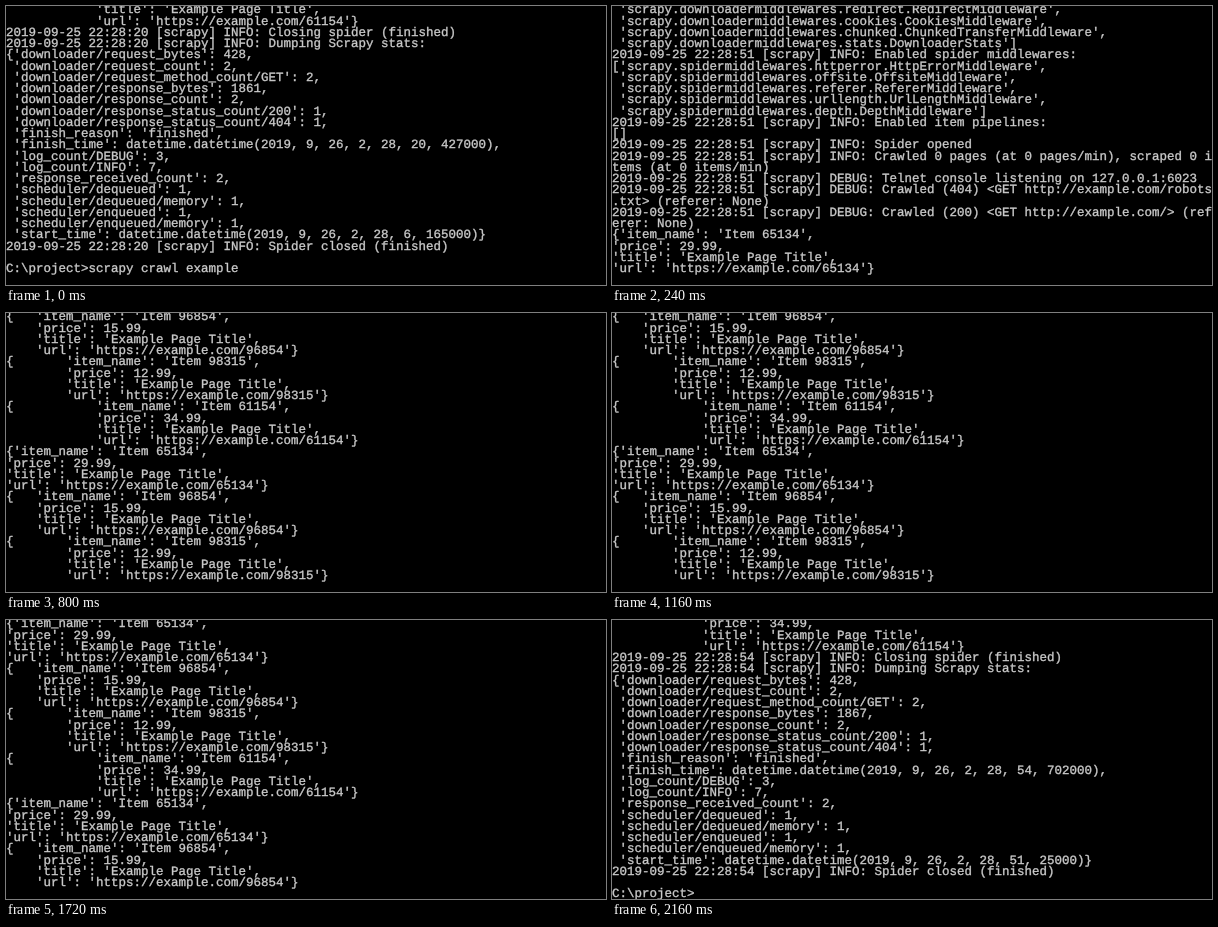
An HTML page that plays this animation: 600 px wide and 279 px high, repeating every 2.2 s.

```html
<!DOCTYPE html>
<html lang="en">
<head>
<meta charset="utf-8">
<title>Crawl log</title>
<style>
html, body { margin: 0; width: 100%; height: 100%; overflow: hidden; background: #000; }
#screen {
  position: absolute; left: 0; top: -0.7px; margin: 0;
  color: #cacaca;
  -webkit-text-stroke: 0.35px #cacaca;
  font: 12.5px/11.25px "Liberation Mono", "DejaVu Sans Mono", monospace;
  text-rendering: geometricPrecision;
  white-space: pre;
}
</style>
</head>
<body>
<pre id="screen"></pre>
<script>
const LOOP = 2200, FRAME = 40, COLS = 80, ROWS = 25;
const ITEM_START = 5.6, ITEM_GAP = 2.15, ITEM_COUNT = 20;
const PRODUCTS = [[65134, '29.99'], [96854, '15.99'], [98315, '12.99'], [61154, '34.99']];
const PROMPT = 'C:\\project>';

const log = (sec, msg, level = 'INFO') => `2019-09-25 22:28:${sec} [scrapy] ${level}: ${msg}\n`;
const list = names => `[${names.map(n => `'${n}'`).join(',\n ')}]\n`;
const middlewares = (kind, names) =>
  list(names.split(' ').map(n => `scrapy.${kind}middlewares.${n.replace(':', '.')}`));

function item(i) {
  const [id, price] = PRODUCTS[i % 4];
  const indent = ' '.repeat(4 * (i % 4));
  return [`'item_name': 'Item ${id}',`, `'price': ${price},`,
    `'title': 'Example Page Title',`, `'url': 'https://example.com/${id}'}`]
    .map((s, k) => (k ? indent : '{' + indent.slice(1)) + s + '\n').join('');
}

function closing(sec, bytes, finish, start) {
  const stats = [
    ['downloader/request_bytes', 428], ['downloader/request_count', 2],
    ['downloader/request_method_count/GET', 2], ['downloader/response_bytes', bytes],
    ['downloader/response_count', 2], ['downloader/response_status_count/200', 1],
    ['downloader/response_status_count/404', 1], ['finish_reason', "'finished'"],
    ['finish_time', `datetime.datetime(2019, 9, 26, 2, 28, ${finish})`],
    ['log_count/DEBUG', 3], ['log_count/INFO', 7], ['response_received_count', 2],
    ['scheduler/dequeued', 1], ['scheduler/dequeued/memory', 1],
    ['scheduler/enqueued', 1], ['scheduler/enqueued/memory', 1],
    ['start_time', `datetime.datetime(2019, 9, 26, 2, 28, ${start})`]];
  return log(sec, 'Closing spider (finished)') + log(sec, 'Dumping Scrapy stats:') +
    `{${stats.map(([k, v]) => `'${k}': ${v}`).join(',\n ')}}\n` +
    log(sec, 'Spider closed (finished)') + '\n' + PROMPT;
}

// Each entry: frame at which the text is printed, text
const output = [
  [0, item(3) + closing(20, 1861, '20, 427000', '6, 165000') + 'scrapy crawl example\n'],
  [1, log(51, 'Scrapy 1.0.3 started (bot: example)') +
      log(51, 'Optional features available: ssl, http11')],
  [2, log(51, "Overridden settings: {'BOT_NAME': 'example'}") +
      log(51, 'Enabled extensions: CloseSpider, TelnetConsole, LogStats, CoreStats, SpiderState')],
  [3, log(51, 'Enabled downloader middlewares:') + middlewares('downloader',
      'robotstxt:RobotsTxtMiddleware httpauth:HttpAuthMiddleware ' +
      'downloadtimeout:DownloadTimeoutMiddleware useragent:UserAgentMiddleware ' +
      'retry:RetryMiddleware defaultheaders:DefaultHeadersMiddleware ' +
      'redirect:MetaRefreshMiddleware httpcompression:HttpCompressionMiddleware ' +
      'redirect:RedirectMiddleware cookies:CookiesMiddleware ' +
      'chunked:ChunkedTransferMiddleware stats:DownloaderStats')],
  [4, log(51, 'Enabled spider middlewares:') + middlewares('spider',
      'httperror:HttpErrorMiddleware offsite:OffsiteMiddleware referer:RefererMiddleware ' +
      'urllength:UrlLengthMiddleware depth:DepthMiddleware') +
      log(51, 'Enabled item pipelines:') + list([]) + log(51, 'Spider opened')],
  [5, log(51, 'Crawled 0 pages (at 0 pages/min), scraped 0 items (at 0 items/min)') +
      log(51, 'Telnet console listening on 127.0.0.1:6023', 'DEBUG') +
      log(51, 'Crawled (404) <GET http://example.com/robots.txt> (referer: None)', 'DEBUG') +
      log(51, 'Crawled (200) <GET http://example.com/> (referer: None)', 'DEBUG')]
];
for (let i = 0; i < ITEM_COUNT; i++) output.push([ITEM_START + i * ITEM_GAP, item(i)]);
output.push([ITEM_START + ITEM_COUNT * ITEM_GAP, closing(54, 1867, '54, 702000', '51, 25000')]);

const wrap = line => line.match(new RegExp(`.{1,${COLS}}`, 'g')) || [''];

function screenAt(frame) {
  const text = output.filter(([at]) => at <= frame).map(([, s]) => s).join('');
  return text.split('\n').flatMap(wrap).slice(-ROWS).join('\n');
}

const screen = document.getElementById('screen');
let shown = -1;
function draw(now) {
  const frame = Math.floor((now % LOOP) / FRAME);
  if (frame !== shown) screen.textContent = screenAt(shown = frame);
}
const begin = performance.now();
function tick() {
  draw(performance.now() - begin);
  requestAnimationFrame(tick);
}
tick();
</script>
</body>
</html>
```
